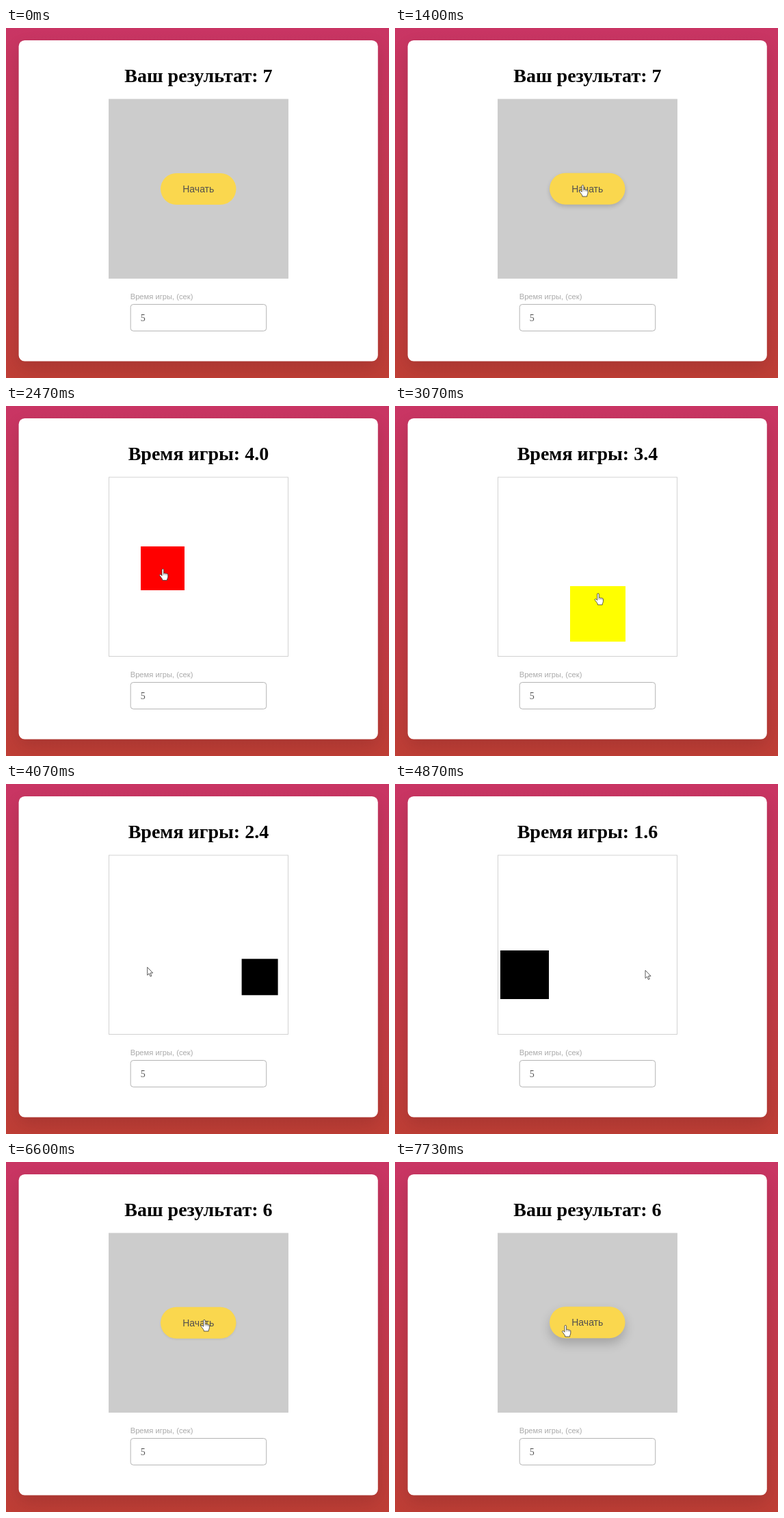
An HTML page that plays this animation: 560x511 px, repeating every 8.74 s.

```html
<!DOCTYPE html>
<html lang="ru">
<head>
<meta charset="utf-8">
<title>Игра на скорость</title>
<style>
html, body { margin: 0; width: 100%; height: 100%; overflow: hidden; }
svg { display: block; width: 560px; height: 511px; }
.serif { font-family: "Liberation Serif", "Times New Roman", serif; }
.sans { font-family: "Liberation Sans", Arial, sans-serif; }
</style>
</head>
<body>
<svg viewBox="0 0 560 511">
  <defs>
    <linearGradient id="bg" x1="0" y1="0" x2="0" y2="1">
      <stop offset="0" stop-color="#c93564"/>
      <stop offset="1" stop-color="#be3e35"/>
    </linearGradient>
    <filter id="soft" x="-20%" y="-20%" width="140%" height="140%">
      <feGaussianBlur stdDeviation="13"/>
    </filter>
    <filter id="glow" x="-50%" y="-100%" width="200%" height="300%">
      <feGaussianBlur id="blur" stdDeviation="0"/>
    </filter>
  </defs>
  <rect width="560" height="511" fill="url(#bg)"/>
  <rect x="18.6" y="28" width="525.2" height="468.6" rx="8.75" opacity=".12" filter="url(#soft)"/>
  <rect x="18.6" y="18" width="525.2" height="468.6" rx="8.75" fill="#fff"/>
  <text id="title" class="serif" x="281.4" y="79" font-size="28" font-weight="700" text-anchor="middle"></text>
  <rect id="field" x="150.5" y="104" width="262" height="261.5" stroke="#ccc" stroke-width=".875"/>
  <rect id="target"/>
  <g id="start">
    <rect id="shade" x="226" y="212" width="110.5" height="46" rx="23" filter="url(#glow)"/>
    <g id="button">
      <rect x="226" y="212" width="110.5" height="46" rx="23" fill="#fad74e"/>
      <text class="sans" x="281.3" y="240" font-size="14" text-anchor="middle" fill="#524f4e">Начать</text>
    </g>
  </g>
  <text class="sans" x="181.7" y="395.5" font-size="11.2" fill="#aaa">Время игры, (сек)</text>
  <rect x="182.2" y="403.5" width="198.5" height="38.8" rx="4" fill="#fff" stroke="#aaa" stroke-width=".875"/>
  <text class="serif" x="196.8" y="428" font-size="14" fill="#555">5</text>
  <g id="cursor" fill="#fff" stroke="#333" stroke-width=".8" stroke-linejoin="round">
    <path id="arrow" d="M0 0V11.6L2.6 9.2 4.4 13.5 6.2 12.7 4.4 8.4H8z"/>
    <g id="hand">
      <path d="M-1.3 1.2a1.3 1.3 0 0 1 2.6 0V6.6c.4-.9 2-.8 2.3.2.5-.7 1.9-.5 2.1.5.6-.6 1.8-.2 1.8.9V11.5c0 1.6-.9 2.6-1.2 3.6V16.5H-.6V15.4C-1.3 13.6-3.2 11.6-4.6 9.6c-.7-1.2.7-2.2 1.8-1.3l1.5 1.5z"/>
      <path fill="none" stroke-width=".5" d="M1.3 6.6V9M3.6 7V9M5.7 7.5V9.5"/>
    </g>
  </g>
</svg>
<script>
const LOOP = 8740, TICK = 1000 / 15;
const ENTER = 330, START = 1460, CLOCK = 1430, END = 6460;
const PAUSE = 70, SETTLE = 135; // pointer rests after and before each click

// each stage lasts until the next one; aim is where the pointer goes
const stages = [
  { at: ENTER, aim: [274.5, 229.5] },
  { at: START, box: [211, 285, 78], fill: "#ff0", aim: [255.3, 319.5] },
  { at: 2195, box: [197, 205, 64], fill: "#f00" },
  { at: 2660, box: [256, 263, 81], fill: "#ff0", aim: [303, 277] },
  { at: 3460, box: [182, 247, 76], fill: "#ff0", aim: [206.7, 267.5] },
  { at: 4060, box: [344.6, 255.3, 53], fill: "#000", aim: [366, 272] },
  { at: 4860, box: [154, 243, 71], fill: "#000", aim: [191.7, 270.8] },
  { at: 5725, box: [291, 182, 61], fill: "#f00", aim: [318, 225] },
  { at: END, aim: [249.3, 238.5] }
];
let from = [553, 498];
stages.forEach((s, i) => {
  const next = stages[i + 1];
  s.end = next ? next.at : END + 640;
  s.from = from;
  if (!s.aim) s.aim = [s.box[0] + s.box[2] / 2, s.box[1] + s.box[2] / 2];
  from = s.aim;
});

const $ = id => document.getElementById(id);
const set = (id, attrs) => {
  for (const k in attrs) $(id).setAttribute(k, attrs[k]);
};
const show = (id, on) => set(id, { visibility: on ? "inherit" : "hidden" });
const progress = (t, a, b) => Math.min(1, Math.max(0, (t - a) / (b - a)));
const smooth = u => u * u * (3 - 2 * u);
const easeOut = u => 1 - (1 - u) ** 3;

function pointer(t, stage) {
  const entering = stage === stages[0];
  const u = progress(t, stage.at + (entering ? 0 : PAUSE), stage.end - SETTLE);
  const k = entering ? smooth(u) : easeOut(u);
  return stage.from.map((a, i) => a + (stage.aim[i] - a) * k);
}

const inside = (px, py, x, y, w, h) => px >= x && px <= x + w && py >= y && py <= y + h;

function draw(time) {
  // the screen refreshes 15 times a second
  const t = Math.floor((time + 4) / TICK) * TICK;
  const stage = stages.filter(s => s.at <= t).pop() || stages[0];
  const playing = Boolean(stage.box);
  const [x, y] = pointer(t, stage);
  let over;

  show("target", playing);
  show("start", !playing);
  set("field", { fill: playing ? "#fff" : "#ccc" });

  if (playing) {
    const left = 5 - Math.floor((t - CLOCK) / 100) / 10;
    const [bx, by, size] = stage.box;
    $("title").textContent = "Время игры: " + left.toFixed(1);
    set("target", { x: bx, y: by, width: size, height: size, fill: stage.fill });
    over = inside(x, y, bx, by, size, size);
  } else {
    $("title").textContent = "Ваш результат: " + (t < START ? 7 : 6);
    const lift = t < START
      ? smooth(progress(t, 1000, 1270)) - 0.6 * smooth(progress(t, 1270, 1400))
      : smooth(progress(t, END, 6980));
    set("button", { transform: `translate(0 ${-0.8 * lift})` });
    set("shade", { transform: `translate(0 ${7 * lift})`, opacity: 0.2 * Math.min(1, 2 * lift) });
    set("blur", { stdDeviation: 8 * lift });
    over = inside(x, y, 226, 212, 110.5, 46);
  }

  show("cursor", t >= ENTER);
  show("hand", over);
  show("arrow", !over);
  set("cursor", { transform: `translate(${x} ${y})` });
}

const begin = performance.now();
function loop() {
  draw((performance.now() - begin) % LOOP);
  requestAnimationFrame(loop);
}
loop();
</script>
</body>
</html>
```
